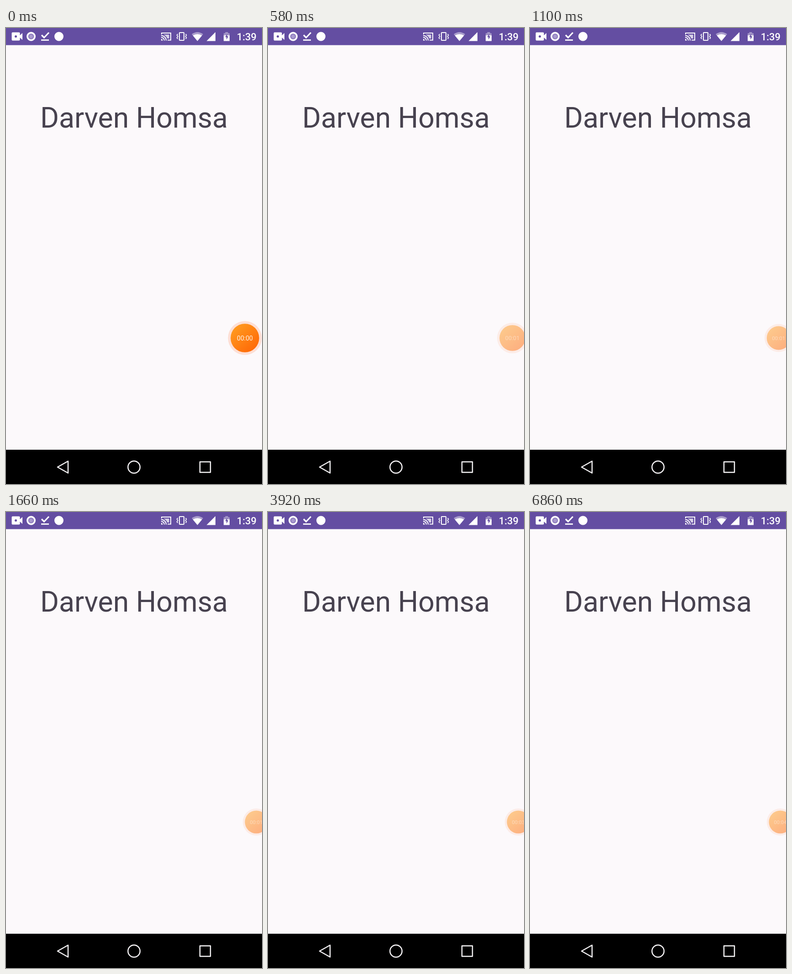
An HTML page for the animation above (8000 ms loop, 561 px wide and 998 px high).

```html
<!DOCTYPE html>
<html lang="en">
<head>
<meta charset="utf-8">
<title>Name screen</title>
<style>
  html, body { margin: 0; width: 100%; height: 100%; overflow: hidden; background: #fcf9fb; }
  svg { display: block; width: 100vw; height: 100vh; font-family: Roboto, sans-serif; }
</style>
</head>
<body>
<svg viewBox="0 0 561 998">
  <defs>
    <linearGradient id="orange" x1="0.15" y1="0.1" x2="0.85" y2="0.9">
      <stop offset="0" stop-color="#ff9a1f"/>
      <stop offset="1" stop-color="#ff6907"/>
    </linearGradient>
  </defs>
  <rect width="561" height="998" fill="#fcf9fb"/>
  <rect width="561" height="37.5" fill="#644ea2"/>

  <!-- status bar, left -->
  <g fill="#fff">
    <path d="M14.500 9.500h14q2 0 2 2v4.500l5.500-5v15l-5.500-5v4.500q0 2-2 2h-14q-2 0-2-2v-14q0-2 2-2z"/>
    <circle cx="21.500" cy="18.500" r="2.500" fill="#644ea2"/>
    <circle cx="55" cy="18.500" r="10"/>
    <circle cx="55" cy="18.500" r="6.300" fill="#8d7bbd"/>
    <circle cx="55" cy="18.500" r="4" fill="#a99bcf"/>
    <path d="M78 15.500l5.500 5.500L94 10" fill="none" stroke="#fff" stroke-width="3.200"/>
    <rect x="77" y="25" width="17" height="2.800"/>
    <circle cx="116" cy="18.500" r="10"/>
  </g>

  <!-- status bar, right -->
  <g fill="none" stroke="#fff" stroke-width="2">
    <path d="M341 14v-3h20v15.500h-7"/>
    <path d="M340 16.500a11 11 0 0 1 11 11M340 20.500a7 7 0 0 1 7 7"/>
    <path d="M340 24v3.500h3.500a3.500 3.500 0 0 0-3.500-3.500z" fill="#fff" stroke="none"/>
    <path d="M345 14.500h12.500v8.500h-4q-2-6-8.500-8.500z" fill="#fff" stroke="none" opacity=".75"/>
    <rect x="380" y="10" width="10" height="17" rx="1"/>
    <path d="M376.500 13l-2 2.500 2 3-2 3 2 2.500M393.500 13l2 2.500-2 3 2 3-2 2.500" stroke-width="1.700"/>
  </g>
  <g fill="#fff">
    <path d="M419.500 28.500L407 13.500q12.500-9 25 0z" opacity=".45"/>
    <path d="M419.500 28.500L409.500 16.500q10-6 20 0z"/>
    <path d="M439.500 28.500L459 9v19.500z"/>
    <path d="M477 17v-5.500h3.500v-2.500h6v2.500h3.500v5.500z" opacity=".4"/>
    <path d="M477 16h13v12.500h-13z"/>
    <path d="M484.500 12.500l-4 7.500h2.700v5.500l4-7.500h-2.700z" fill="#644ea2"/>
    <text x="549" y="27" font-size="22" font-weight="500" text-anchor="end">1:39</text>
  </g>

  <text x="280.500" y="217.500" font-size="62.500" text-anchor="middle" fill="#47424f">Darven Homsa</text>

  <g id="bubble">
    <circle r="37" fill="#ff6a2a" opacity=".18"/>
    <circle r="31.300" fill="url(#orange)"/>
    <text id="timer" y="5" font-size="14" text-anchor="middle" fill="#fff3e6">00:00</text>
  </g>

  <!-- navigation bar -->
  <rect y="923" width="561" height="75"/>
  <g fill="none" stroke="#f4f2f4" stroke-width="2.500" stroke-linejoin="round">
    <path d="M113 961L136 948v26z"/>
    <circle cx="280.500" cy="961" r="13.200"/>
    <rect x="425" y="949.500" width="23" height="23"/>
  </g>
</svg>
<script>
  const LOOP = 8000;
  // [time, value]; equal times make a hard change
  const fade = [[140, 1], [140, .83], [280, .5]];
  const dock = [[440, 0], [440, .14], [580, .48], [820, .7], [1100, .85], [1280, .87], [1660, 1]];
  const ticks = [440, 2040, 3660, 6600];

  const bubble = document.getElementById('bubble');
  const timer = document.getElementById('timer');

  function valueAt(keys, t) {
    const i = keys.findIndex(k => t < k[0]);
    if (i === 0) return keys[0][1];
    if (i < 0) return keys[keys.length - 1][1];
    const [t0, a] = keys[i - 1], [t1, b] = keys[i];
    return a + (b - a) * (t - t0) / (t1 - t0);
  }

  function draw(t) {
    const p = valueAt(dock, t);
    const alpha = valueAt(fade, t);
    bubble.setAttribute('transform', `translate(${523.5 + 25 * p} 678.5) scale(${1 - .2 * p})`);
    bubble.setAttribute('opacity', alpha);
    timer.setAttribute('opacity', alpha);
    timer.textContent = '00:0' + ticks.filter(s => t >= s).length;
  }

  const start = performance.now();
  function frame() {
    draw((performance.now() - start) % LOOP);
    requestAnimationFrame(frame);
  }
  draw(0);
  requestAnimationFrame(frame);
</script>
</body>
</html>
```
